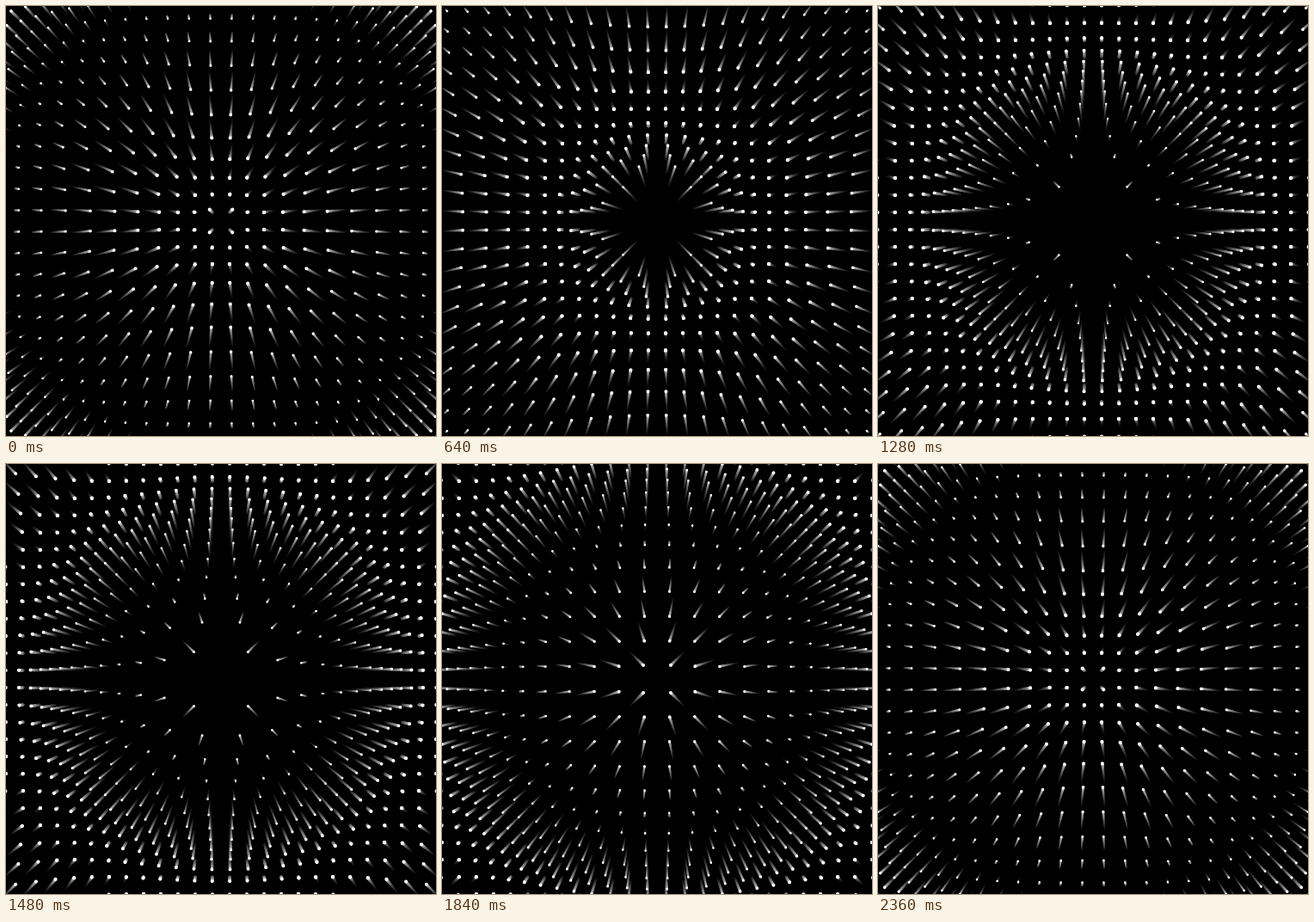
Write an HTML page with a canvas that moves like this. It is 500 px wide and 500 px high and loops after 2400 ms.

```html
<!DOCTYPE html>
<html lang="en">
<head>
<meta charset="utf-8">
<title>Dot wave</title>
<style>
html, body { margin: 0; width: 100%; height: 100%; overflow: hidden; background: #000; }
canvas { display: block; width: 500px; height: 500px; }
</style>
</head>
<body>
<canvas id="stage" width="500" height="500"></canvas>
<script>
const ctx = document.getElementById('stage').getContext('2d');
const TAU = Math.PI * 2;
const LOOP = 2400, STEP = 40;
const GAP = 20, HALF = 13;
const WAVE = 353, REST = 49, PUSH = 50;
const TRAIL = 0.17, SAMPLES = 24;

const dots = [];
for (let i = -HALF; i < HALF; i++) {
  for (let j = -HALF; j < HALF; j++) {
    const x = (i + 0.5) * GAP, y = (j + 0.5) * GAP, r = Math.hypot(x, y);
    dots.push({ r, ux: x / r, uy: y / r });
  }
}

// 0 on the resting ring, 1 half a wave away from it
const lift = (r, t) => 0.5 - 0.5 * Math.cos(TAU * ((r - REST) / WAVE - t));

function drawLayer(t, shade, scale) {
  const g = Math.round(255 * shade);
  ctx.fillStyle = `rgb(${g},${g},${g})`;
  ctx.beginPath();
  for (const { r, ux, uy } of dots) {
    const k = lift(r, t);
    const d = r + PUSH * k, size = scale * (2.2 - k);
    const x = 250 + ux * d, y = 250 + uy * d;
    ctx.moveTo(x + size, y);
    ctx.arc(x, y, size, 0, TAU);
  }
  ctx.fill();
}

function draw(t) {
  ctx.fillStyle = '#000';
  ctx.fillRect(0, 0, 500, 500);
  // dim, tapering trail from the oldest sample on, then the white head
  for (let i = SAMPLES - 1; i > 0; i--) {
    const age = i / SAMPLES;
    drawLayer(t - TRAIL * age, 0.7 * Math.pow(1 - age, 1.4), 0.85 - 0.3 * age);
  }
  drawLayer(t, 1, 1);
}

const start = performance.now();
let shown = -1;
function tick() {
  const step = Math.floor(((performance.now() - start) % LOOP) / STEP);
  if (step !== shown) {
    shown = step;
    draw(step * STEP / LOOP);
  }
  requestAnimationFrame(tick);
}
tick();
</script>
</body>
</html>
```
